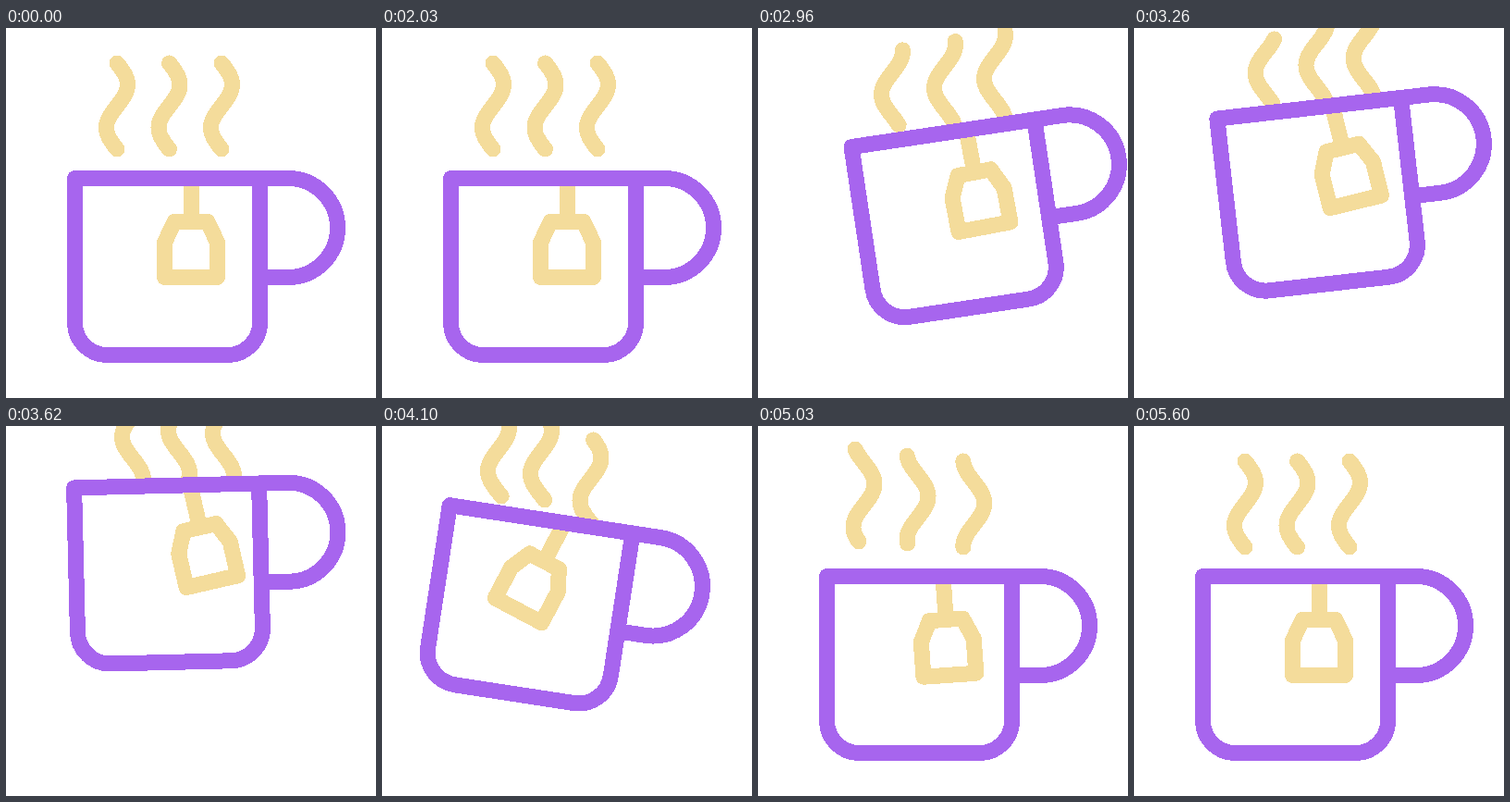
Recreate the animation shown at these times as an HTML page. Size 400 by 400 pixels, loop 5840 ms.

```html
<!DOCTYPE html>
<html lang="en">
<head>
<meta charset="utf-8">
<title>Tea cup</title>
<style>
  html, body { margin: 0; width: 100%; height: 100%; overflow: hidden; background: #fff; }
  svg { display: block; width: 100vw; height: 100vh; shape-rendering: crispEdges; }
  path { fill: none; stroke-width: 17; stroke-linecap: round; stroke-linejoin: round; }
  .cream { stroke: #f4dc9b; }
  .purple { stroke: #a765ee; }
  #inside { fill: #fff; }
</style>
</head>
<body>
<svg viewBox="0 0 400 400">
  <path class="cream steam"/>
  <path class="cream steam"/>
  <path class="cream steam"/>
  <g id="mug">
    <path id="inside" d="M74.5 162.5V318a35 35 0 0 0 35 35.5H239a35 35 0 0 0 35.5-35.5V162.5Z"/>
    <path id="bag" class="cream" d="M200 165V209M182 209.5H218L228.5 232V269.5H171.5V232Z"/>
    <path class="purple" d="M274.5 162.5V318a35 35 0 0 1-35.5 35.5H109.5a35 35 0 0 1-35-35.5V162.5H305a53.5 53.5 0 0 1 0 107H276"/>
  </g>
</svg>
<script>
const LOOP = 5840, START = 2030, END = 5600, STEP = 30;
const WAVE = 93, SWAY = 11.5, TOP = 38, BOTTOM = TOP + WAVE;

// The mug floats round a loop: out to the right, up, left and down.
const mugTimes = [START, 2600, 2960, 3620, 4100, 4700];
const mugX = track(mugTimes, [0, 32, 30.7, 0, -8.4, 0]);
const mugY = track(mugTimes, [0, -28, -52.9, -98.7, -58.2, 0]);
const mugTurn = track(mugTimes, [0, -8.5, -8.5, -1.4, 8.7, 0]);
const bagTurn = track([START, 2960, 3580, 4120, 5050, 5330, END],
                      [0, -2.2, -12, 19.3, -4, 3, 0]);

// Each wisp drifts sideways, lifts, and scrolls two whole waves upwards.
const steamTimes = [START, 2960, 3620, 4100, 4610, END];
const wisp = (lag, shift, lift, scroll) => ({
  lag,
  shift: track(steamTimes, [0, ...shift, 0]),
  lift: track(steamTimes, [0, ...lift, 0]),
  scroll: track(steamTimes, [0, ...scroll, 2 * WAVE])
});
const wisps = [
  wisp(300, [25, 17, 6, -9], [-26, -71, -55, -16], [36, 96, 152, 182]),
  wisp(130, [25.5, 10.5, -4.5, -6.5], [-29, -73, -51, -11], [43, 103, 149, 157]),
  wisp(0, [23, 2, -7.5, 0.5], [-34, -75, -23, 0], [53, 100, 120, 140])
];

// Smooth interpolation through keys without overshoot, at rest at both ends.
function track(times, values) {
  const last = times.length - 1;
  const rise = i => (values[i + 1] - values[i]) / (times[i + 1] - times[i]);
  const slope = values.map((_, i) => {
    if (i === 0 || i === last) return 0;
    const a = rise(i - 1), b = rise(i);
    return a * b > 0 ? 2 * a * b / (a + b) : 0;
  });
  return t => {
    if (t <= times[0]) return values[0];
    if (t >= times[last]) return values[last];
    const i = times.findIndex(k => k > t) - 1;
    const span = times[i + 1] - times[i], u = (t - times[i]) / span, v = 1 - u;
    return values[i] * (1 + 2 * u) * v * v + values[i + 1] * u * u * (3 - 2 * u)
      + span * u * v * (slope[i] * v - slope[i + 1] * u);
  };
}

function wavePath(x, scroll, top, bottom) {
  const count = 48, points = [];
  for (let i = 0; i <= count; i++) {
    const y = top + (bottom - top) * i / count;
    const dx = SWAY * Math.sin(2 * Math.PI * (y + scroll - TOP) / WAVE);
    points.push((x + dx).toFixed(2) + ' ' + y.toFixed(2));
  }
  return 'M' + points.join('L');
}

const mug = document.getElementById('mug');
const bag = document.getElementById('bag');
const steam = document.querySelectorAll('.steam');

function draw(time) {
  let t = Math.min(Math.max(time % LOOP, START), END);
  t = START + Math.floor((t - START) / STEP) * STEP;
  mug.setAttribute('transform',
    `translate(${mugX(t)} ${mugY(t)}) rotate(${mugTurn(t)} 200 200)`);
  bag.setAttribute('transform', `rotate(${bagTurn(t)} 200 163)`);
  wisps.forEach(({ lag, shift, lift, scroll }, i) => {
    // The top end trails the bottom end, which stretches the wisp on the way down.
    const trail = t === END ? t : t - lag;
    steam[i].setAttribute('d', wavePath(120 + 56.5 * i + shift(t), scroll(t),
      TOP + lift(trail), BOTTOM + lift(t)));
  });
}

let origin;
function tick(now) {
  origin ??= now;
  draw(now - origin);
  requestAnimationFrame(tick);
}
draw(0);
requestAnimationFrame(tick);
</script>
</body>
</html>
```
